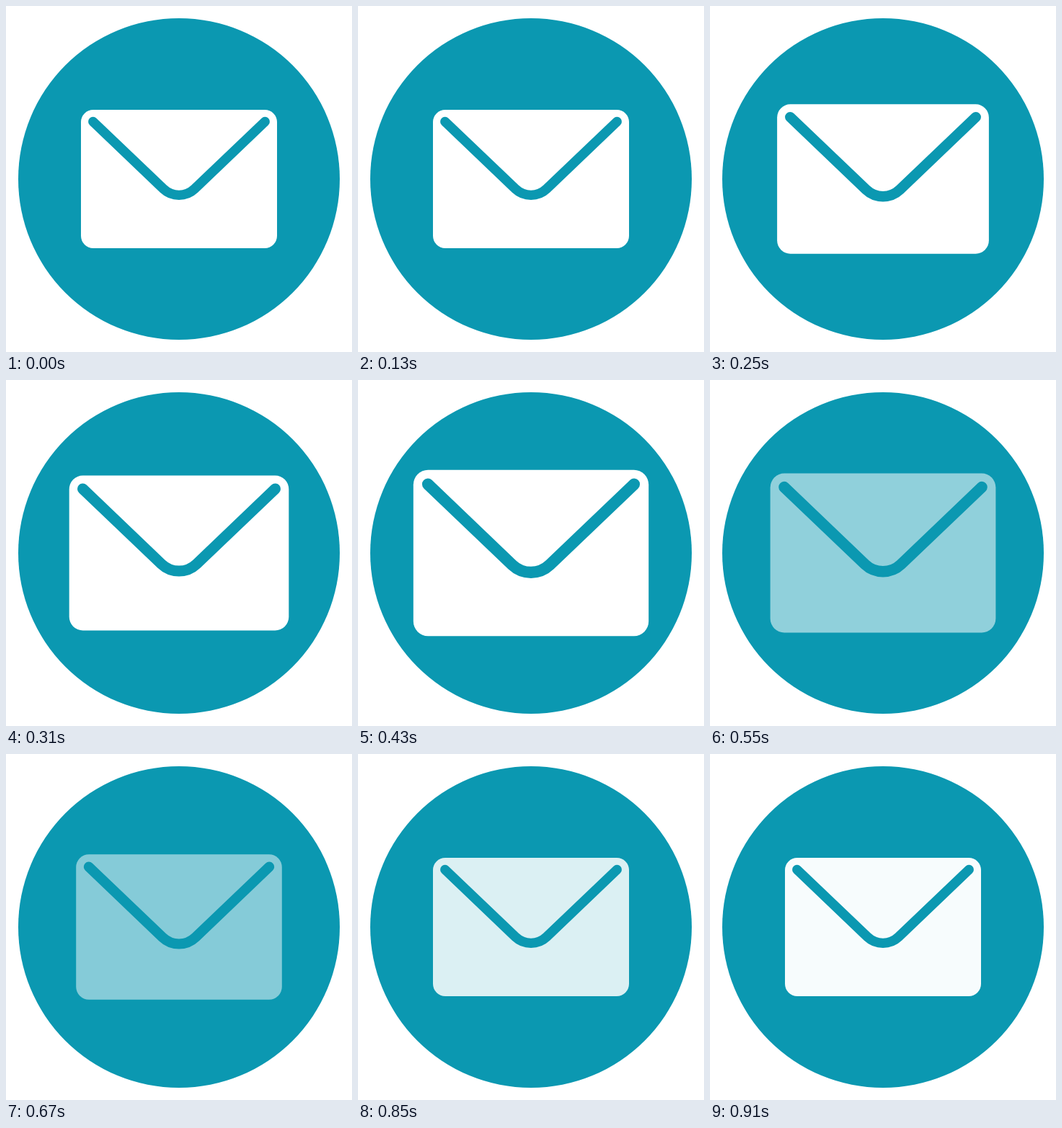
Recreate the animation shown at these times as an HTML page. Size 480 px wide and 480 px high, loop 0.97 s.

```html
<!DOCTYPE html>
<html lang="en">
<head>
<meta charset="utf-8">
<title>Mail pulse</title>
<style>
  html, body { margin: 0; width: 100%; height: 100%; overflow: hidden; background: #fff; }
  svg { display: block; width: 100%; height: 100%; }
  .disc { fill: #0b98b1; }
  .paper { fill: #fff; }
  .flap { fill: none; stroke: #0b98b1; stroke-width: 13.4; stroke-linecap: round; }
</style>
</head>
<body>
<svg viewBox="0 0 480 480">
  <circle class="disc" cx="240" cy="240" r="223"/>
  <g id="mail">
    <rect class="paper" id="paper" x="104" y="144" width="272" height="192" rx="17"/>
    <path class="flap" d="M120.8 160.5 L218.3 253.7 A31.5 31.5 0 0 0 261.7 253.7 L359.2 160.5"/>
  </g>
</svg>
<script>
  const LOOP = 970, HOLD = 130, STEP = 60;
  const mail = document.getElementById('mail');
  const paper = document.getElementById('paper');

  const part = (k, from, to) => Math.min(1, Math.max(0, (k - from) / (to - from)));
  const sine = p => (1 - Math.cos(Math.PI * p)) / 2;

  // Linear swell, then an eased return to rest
  const scaleAt = k => 1 + 0.2 * (part(k, 1, 6) - sine(part(k, 6, 12)));

  // Quick fade to half, then a slow linear recovery
  const alphaAt = k => k <= 10
    ? 0.5 + 0.5 * (1 - part(k, 6, 9)) ** 2.2
    : 0.5 + 0.47 * part(k, 10, 14);

  function draw(now) {
    const t = now % LOOP;
    const k = t < HOLD ? 0 : 1 + Math.floor((t - HOLD) / STEP);
    mail.setAttribute('transform',
      `translate(240 240) scale(${scaleAt(k)}) translate(-240 -240)`);
    paper.setAttribute('fill-opacity', alphaAt(k));
  }

  const start = performance.now();
  function tick() {
    draw(performance.now() - start);
    requestAnimationFrame(tick);
  }
  tick();
</script>
</body>
</html>
```
